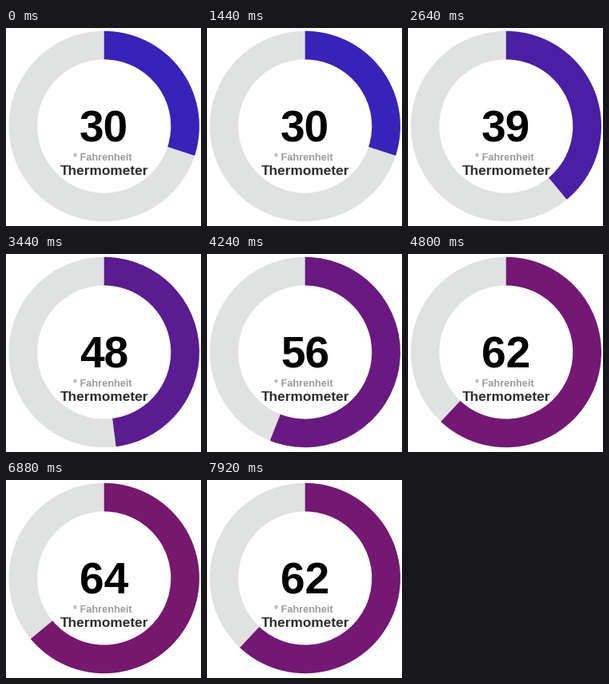
Write a matplotlib script that moves like this. It is 244 px wide and 248 px high and loops after 8000 ms.

```python
import numpy as np
import matplotlib.pyplot as plt
from matplotlib.animation import FuncAnimation
from matplotlib.patches import Wedge

WIDTH, HEIGHT, DPI = 244, 248, 100
INTERVAL, FRAMES = 80, 100
CENTER, RADIUS, BAND = (122.7, 123), 119.2, 35.6
COLD, HOT = np.array([0, 43, 250]), np.array([186, 12, 32])


def reading(ms):
    """Hold, climb steadily to the peak, rest there, then sink more slowly."""
    return int(np.interp(ms, [1740, 5500, 6000, 7392], [30, 70, 70, 62]))


def gauge_color(value):
    return (COLD + (HOT - COLD) * value / 100) / 255


def label(x, y, text, size, color):
    return ax.text(x, y, text, fontsize=size * 72 / DPI, color=color,
                   family="Liberation Sans", weight="bold",
                   ha="center", va="baseline")


def ring(color):
    return ax.add_patch(Wedge(CENTER, RADIUS, -90, 270, width=BAND,
                              facecolor=color, linewidth=0))


fig = plt.figure(figsize=(WIDTH / DPI, HEIGHT / DPI), dpi=DPI, facecolor="white")
ax = fig.add_axes([0, 0, 1, 1])
ax.set(xlim=(0, WIDTH), ylim=(HEIGHT, 0))
ax.axis("off")

ring("#e0e2e2")
arc = ring("blue")
number = label(122.5, 142.5, "", 55, "black")
label(120.5, 166, "° Fahrenheit", 12.7, "#9c9c9c")
label(122.7, 184, "Thermometer", 17.2, "#2e2e30")


def update(frame):
    value = reading(frame * INTERVAL)
    arc.set_theta2(-90 + 3.6 * value)
    arc.set_facecolor(gauge_color(value))
    number.set_text(str(value))
    return arc, number


anim = FuncAnimation(fig, update, frames=FRAMES, interval=INTERVAL,
                     repeat=True, repeat_delay=0)
plt.show()
```
